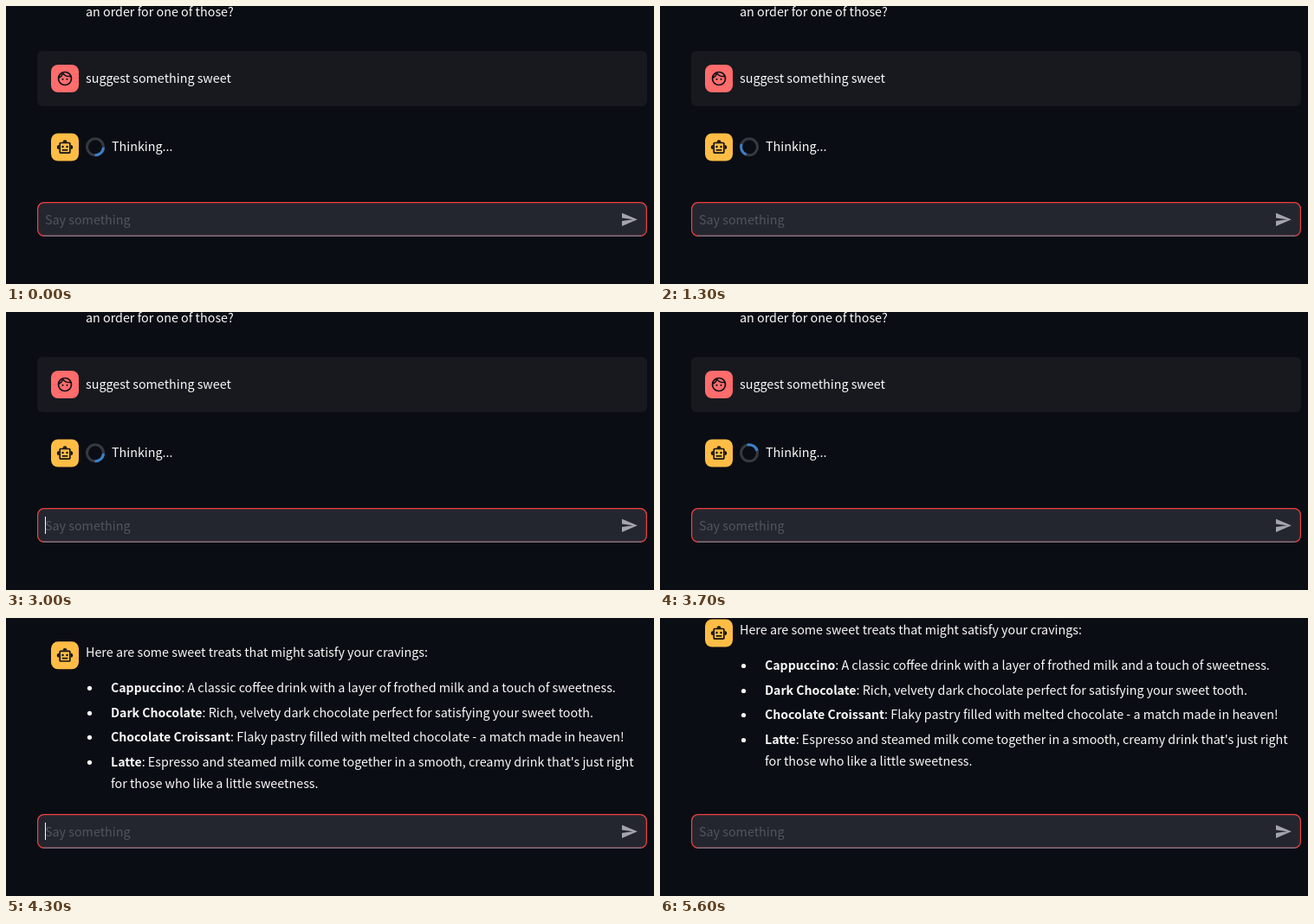
An HTML page with a canvas that plays this animation: 748 px wide and 322 px high, repeating every 6.1 s.

```html
<!DOCTYPE html>
<html lang="en">
<head>
<meta charset="utf-8">
<title>Chat</title>
<style>
  html, body { margin: 0; width: 100%; height: 100%; overflow: hidden; background: #0b0d14; }
  canvas { display: block; width: 748px; height: 322px; }
</style>
</head>
<body>
<canvas id="stage"></canvas>
<script>
const W = 748, H = 322, LOOP = 6100, TICK = 100;
const REPLY_AT = 4200, SCROLL_AT = 4230, SCROLL = 146, BLINK = 600;
const BG = '#0b0d14', INK = '#fafafa', DARK = '#0e1117';
const FAMILY = '"Noto Sans CJK JP", "Noto Sans CJK SC", "Noto Sans CJK", "Open Sans", sans-serif';
const FONT = `14.32px ${FAMILY}`, BOLD = `bold 14.1px ${FAMILY}`;

const ITEMS = [
  [206, 'Cappuccino', ': A classic coffee drink with a layer of frothed milk and a touch of sweetness.'],
  [235, 'Dark Chocolate', ': Rich, velvety dark chocolate perfect for satisfying your sweet tooth.'],
  [263, 'Chocolate Croissant', ': Flaky pastry filled with melted chocolate - a match made in heaven!'],
  [292, 'Latte', ": Espresso and steamed milk come together in a smooth, creamy drink that's just right"]
];

const canvas = document.getElementById('stage');
const ctx = canvas.getContext('2d');
const dpr = window.devicePixelRatio || 1;
canvas.width = W * dpr;
canvas.height = H * dpr;

function text(str, x, y, color = INK, font = FONT) {
  ctx.font = font;
  ctx.fillStyle = color;
  ctx.fillText(str, x, y);
  return x + ctx.measureText(str).width;
}

function box(x, y, w, h, r, color) {
  ctx.beginPath();
  ctx.roundRect(x, y, w, h, r);
  ctx.fillStyle = color;
  ctx.fill();
}

function dot(x, y, r, color = DARK) {
  ctx.beginPath();
  ctx.arc(x, y, r, 0, 7);
  ctx.fillStyle = color;
  ctx.fill();
}

function line(width, color, trace) {
  ctx.beginPath();
  trace();
  ctx.lineWidth = width;
  ctx.strokeStyle = color;
  ctx.stroke();
}

// Icons are drawn on a 24-unit grid.
function icon(x, y, scale, draw) {
  ctx.save();
  ctx.translate(x, y);
  ctx.scale(scale, scale);
  draw();
  ctx.restore();
}

function face() {
  line(2, DARK, () => ctx.arc(12, 12, 9, 0, 7));
  line(1.9, DARK, () => {
    ctx.moveTo(3.6, 10.9);
    ctx.quadraticCurveTo(7.6, 9.4, 9.3, 4.4);
    ctx.moveTo(9.5, 4.6);
    ctx.bezierCurveTo(11.6, 8.2, 15.4, 9.7, 20, 8.8);
  });
  dot(9, 13, 1.25);
  dot(15, 13, 1.25);
}

function robot() {
  line(2, DARK, () => ctx.roundRect(5, 6, 14, 14, 1));
  ctx.fillStyle = DARK;
  for (const [x, y, turn] of [[12, 5, 1], [4, 12, 0.5], [20, 12, 1.5]]) {
    ctx.beginPath();
    ctx.arc(x, y, 3, turn * Math.PI, (turn + 1) * Math.PI);
    ctx.fill();
  }
  dot(9, 11.5, 1.5);
  dot(15, 11.5, 1.5);
  ctx.fillRect(8, 15, 8, 2);
}

function send() {
  ctx.beginPath();
  for (const [x, y] of [[2, 21], [23, 12], [2, 3], [2, 10], [17, 12], [2, 14]]) ctx.lineTo(x, y);
  ctx.fillStyle = '#a3a4ae';
  ctx.fill();
}

function avatar(y, color, draw) {
  box(52, y, 32, 32, 8, color);
  icon(58, y + 6, 20 / 24, draw);
}

function thinking(t) {
  const mid = (48 + t * 0.36) * Math.PI / 180;
  line(3, '#363940', () => ctx.arc(103, 163.3, 9.5, 0, 7));
  line(3, '#3a80c8', () => ctx.arc(103, 163.3, 9.5, mid - Math.PI / 4, mid + Math.PI / 4));
  text('Thinking...', 122, 168);
}

function reply() {
  text('Here are some sweet treats that might satisfy your cravings:', 92, 165);
  for (const [y, name, rest] of ITEMS) {
    dot(96.5, y - 4.5, 2.6, INK);
    text(rest, text(name, 121, y, INK, BOLD), y);
  }
  text('for those who like a little sweetness.', 121, 317);
}

// Eases out: the speed falls with the square root of the distance left.
function scrollTop(t) {
  const root = Math.sqrt(SCROLL);
  const left = Math.min(root, Math.max(0, root - (t - SCROLL_AT) / 10));
  return SCROLL - left * left;
}

function messages(t) {
  ctx.save();
  ctx.beginPath();
  ctx.rect(0, 0, W, 214);
  ctx.clip();
  ctx.translate(0, -scrollTop(t));
  text('an order for one of those?', 92, 12);
  box(36, 52, 704, 64, 6, '#17191f');
  avatar(68, '#ff6c6c', face);
  text('suggest something sweet', 92, 89);
  avatar(147.5, '#ffbd45', robot);
  if (t < REPLY_AT) thinking(t);
  else reply();
  ctx.restore();
}

function input(t) {
  box(36, 227, 704, 40, 8, '#24262f');
  line(1.2, '#f0403f', () => ctx.roundRect(36.6, 227.6, 702.8, 38.8, 7.5));
  line(1.2, '#85798a', () => { ctx.moveTo(43, 266.4); ctx.lineTo(733, 266.4); });
  text('Say something', 45, 253, '#52545d');
  icon(709.3, 237.1, 0.85, send);
  const caretOn = Math.floor((t + 1000) / BLINK) % 2 === 0;
  if (caretOn && t >= 200) {
    ctx.fillStyle = INK;
    ctx.fillRect(45, 237, 1, 20);
  }
}

function draw(now) {
  const t = Math.floor(now % LOOP / TICK) * TICK;
  ctx.setTransform(dpr, 0, 0, dpr, 0, 0);
  ctx.fillStyle = BG;
  ctx.fillRect(0, 0, W, H);
  messages(t);
  input(t);
}

const start = performance.now();
function frame() {
  draw(performance.now() - start);
  requestAnimationFrame(frame);
}
frame();
</script>
</body>
</html>
```
